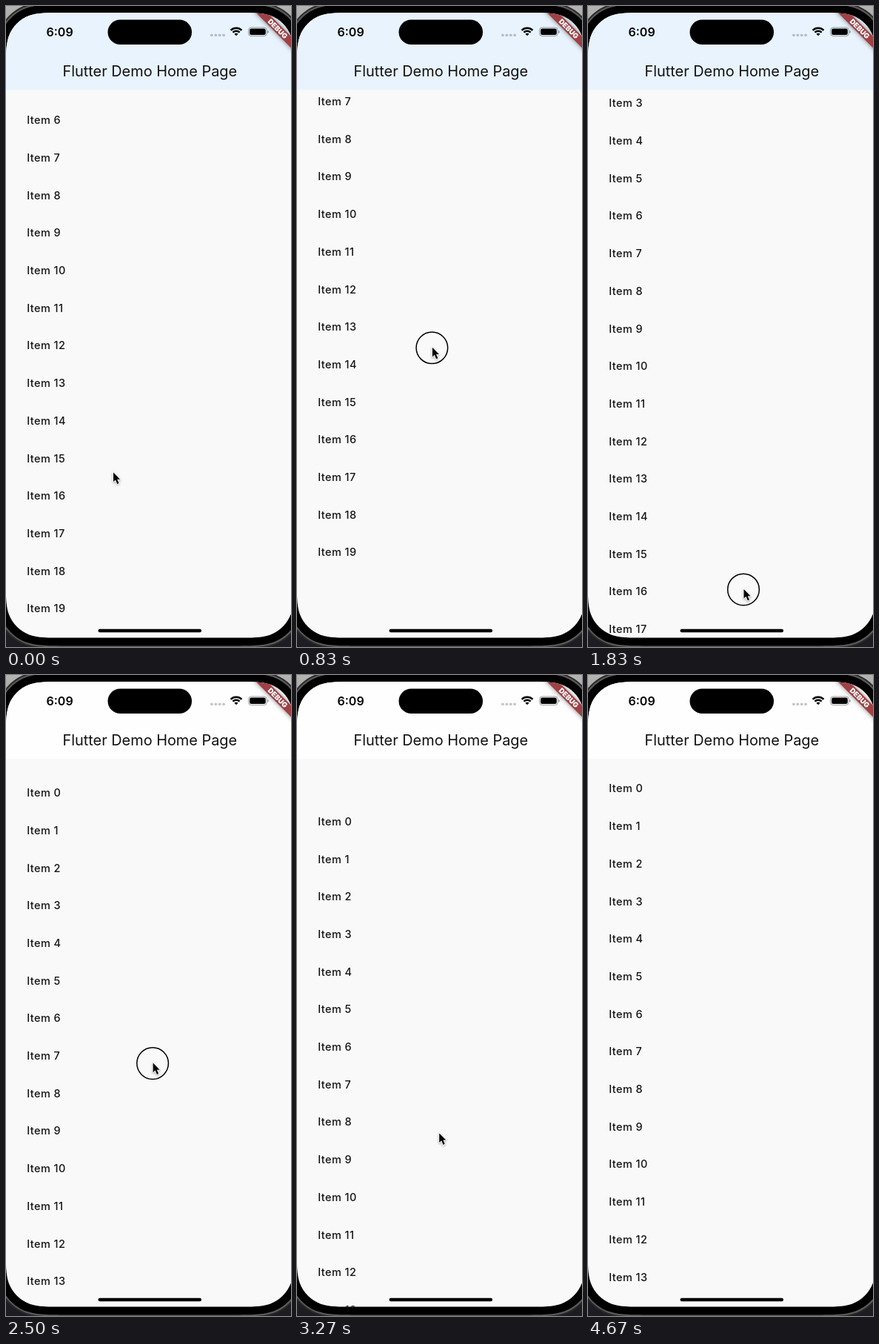
Write an HTML page with a canvas that moves like this. It is 385 by 865 pixels and loops after 4.71 s.

```html
<!DOCTYPE html>
<html lang="en">
<head>
<meta charset="utf-8">
<title>Scrolling list</title>
<style>
html, body { margin: 0; width: 100%; height: 100%; overflow: hidden; background: #000; }
canvas { display: block; width: 385px; height: 865px; }
</style>
</head>
<body>
<canvas id="stage"></canvas>
<script>
const W = 385, H = 865, LOOP = 4710;
const FONT = 'Inter, Roboto, sans-serif';
const SCREEN = { x: -0.2, y: 9, w: 389, h: 843.5, r: 51 };
const HEADER_END = 113, ROW = 50.7;

// Resting place of the first row when the list is at its start or end.
const TOP = 153.2, BOTTOM = -150.2;
// The list follows the pointer with a short delay.
const LAG = 50;
const DRAGS = [
  { from: 330, to: 1920, y: 629.5 },
  { from: 2380, to: 3170, y: 494 }
];
const EXIT = 3830;

// Pointer tip: time, x, y.
const path = [
  [0, 144.5, 629.5], [330, 150, 629.5], [760, 179, 470], [830, 182.3, 461],
  [1270, 205, 228], [1370, 208.5, 335], [1830, 210, 786.5], [1920, 209, 814],
  [2380, 198, 494], [2800, 198.5, 645], [3170, 198, 651],
  [3630, 106.5, 238], [EXIT, -12, -22]
];

const canvas = document.getElementById('stage');
const ctx = canvas.getContext('2d');
const dpr = window.devicePixelRatio || 1;
canvas.width = W * dpr;
canvas.height = H * dpr;

const clamp = v => Math.max(0, Math.min(1, v));

// Monotone cubic interpolation along one column of the path.
function along(t, col) {
  const last = path.length - 1;
  if (t >= path[last][0]) return path[last][col];
  let i = 0;
  while (t >= path[i + 1][0]) i++;
  const span = k => path[k + 1][0] - path[k][0];
  const slope = k => (path[k + 1][col] - path[k][col]) / span(k);
  const tangent = k => {
    if (k === 0) return slope(0);
    if (k === last) return slope(last - 1);
    const a = slope(k - 1), b = slope(k);
    return a * b <= 0 ? 0 : 2 * a * b / (a + b);
  };
  const d = span(i), u = (t - path[i][0]) / d, v = 1 - u;
  return v * v * (1 + 2 * u) * path[i][col] + u * v * v * d * tangent(i) +
    u * u * (3 - 2 * u) * path[i + 1][col] - u * u * v * d * tangent(i + 1);
}

// Overscroll distance for a drag past the edge.
function rubber(drag) {
  const pull = 0.52 * Math.max(0, drag);
  return pull / (1 + pull / 739);
}

function listTop(t) {
  const [first, second] = DRAGS;
  const pulled = (drag, time) => along(Math.max(0, time - LAG), 2) - drag.y;
  const firstPos = time => {
    const d = pulled(first, time);
    return d < 0 ? BOTTOM - rubber(-d) : BOTTOM + d;
  };
  const fling = first.to + LAG;
  if (t < fling) return firstPos(t);
  if (t < second.from + LAG) {
    return TOP - (TOP - firstPos(fling)) * Math.exp((fling - t) / 120);
  }
  if (t < second.to) return TOP + rubber(pulled(second, t));
  const w = (t - second.to) * 0.0135;
  return TOP + rubber(pulled(second, second.to)) * (1 + w) * Math.exp(-w);
}

function roundRect(x, y, w, h, r, color) {
  ctx.beginPath();
  ctx.roundRect(x, y, w, h, r);
  if (color) { ctx.fillStyle = color; ctx.fill(); }
}

// Rectangle with continuous-curvature corners.
function screenRect(grow, color) {
  const s = SCREEN, r = s.r + grow;
  const hw = s.w / 2 + grow, hh = s.h / 2 + grow;
  const a = 1.529 * r, b = 1.088 * r, c = 0.868 * r, d = 0.631 * r;
  const e = 0.373 * r, f = 0.169 * r, g = 0.075 * r;
  ctx.beginPath();
  for (const [sx, sy] of [[-1, -1], [1, -1], [1, 1], [-1, 1]]) {
    const flip = sx * sy < 0;
    const at = (p, q) => {
      const [u, v] = flip ? [q, p] : [p, q];
      return [s.x + s.w / 2 + sx * (hw - u), s.y + s.h / 2 + sy * (hh - v)];
    };
    ctx.lineTo(...at(0, a));
    ctx.bezierCurveTo(...at(0, b), ...at(0, c), ...at(g, d));
    ctx.bezierCurveTo(...at(f, e), ...at(e, f), ...at(d, g));
    ctx.bezierCurveTo(...at(c, 0), ...at(b, 0), ...at(a, 0));
  }
  ctx.closePath();
  ctx.fillStyle = color;
  ctx.fill();
}

function text(str, x, y, size, weight, spacing = 0, color = '#151515', align = 'left') {
  ctx.font = `${weight} ${size}px ${FONT}`;
  ctx.letterSpacing = spacing + 'px';
  ctx.textAlign = align;
  ctx.fillStyle = color;
  ctx.fillText(str, x, y);
}

function drawBezel() {
  const bg = ctx.createLinearGradient(0, 0, 0, H);
  bg.addColorStop(0, '#b4b4b2');
  bg.addColorStop(0.1, '#8c8c8c');
  bg.addColorStop(0.9, '#24242a');
  bg.addColorStop(1, '#1c1c22');
  ctx.fillStyle = bg;
  ctx.fillRect(0, 0, W, H);
  screenRect(15, '#2a2a2a');
  screenRect(13, '#5a5a5a');
  screenRect(11, '#000');
}

function drawList(t) {
  const top = listTop(t);
  ctx.save();
  ctx.beginPath();
  ctx.rect(0, HEADER_END, W, H);
  ctx.clip();
  for (let i = 0; i < 20; i++) {
    const y = top + i * ROW;
    if (y > 95 && y < 870) text('Item ' + i, 28.3, y + 5.2, 14.5, 500, 0.4);
  }
  ctx.restore();
}

function drawHeader(t) {
  const k = clamp((t - 2190) / 200);
  const mix = (a, b) => Math.round(a + (b - a) * k);
  ctx.fillStyle = `rgb(${mix(232, 254)},${mix(243, 254)},${mix(253, 254)})`;
  ctx.fillRect(0, 0, W, HEADER_END);
  text('Flutter Demo Home Page', 194.3, 94.8, 19.9, 400, 0, '#111', 'center');
}

function drawWifi() {
  const x = 311, y = 40.3;
  ctx.save();
  ctx.beginPath();
  ctx.moveTo(x, y);
  ctx.lineTo(x - 14, y - 14);
  ctx.lineTo(x + 14, y - 14);
  ctx.clip();
  ctx.strokeStyle = '#000';
  ctx.lineWidth = 2.4;
  for (const r of [6.6, 10.6]) {
    ctx.beginPath();
    ctx.arc(x, y, r, 0, 7);
    ctx.stroke();
  }
  ctx.beginPath();
  ctx.arc(x, y, 3.6, 0, 7);
  ctx.fillStyle = '#000';
  ctx.fill();
  ctx.restore();
}

function drawStatus() {
  text('6:09', 54.5, 40.8, 16, 600, 0, '#000');
  roundRect(137.5, 18.5, 113.5, 33.5, 16.75, '#000');
  for (let i = 0; i < 4; i++) roundRect(276 + i * 5.4, 37.4, 3.8, 3.8, 1.9, 'rgba(0,0,0,.22)');
  drawWifi();
  roundRect(327.5, 29, 24.8, 11.6, 3.8);
  ctx.strokeStyle = 'rgba(0,0,0,.38)';
  ctx.lineWidth = 1;
  ctx.stroke();
  roundRect(329, 30.5, 21.8, 8.6, 2.4, '#000');
  roundRect(353.4, 33, 1.4, 3.8, [0, 1.4, 1.4, 0], 'rgba(0,0,0,.4)');
}

function drawBanner() {
  ctx.save();
  ctx.translate(SCREEN.x + SCREEN.w, SCREEN.y);
  ctx.rotate(Math.PI / 4);
  ctx.shadowColor = 'rgba(0,0,0,.5)';
  ctx.shadowBlur = 6 * dpr;
  ctx.fillStyle = '#9f4044';
  ctx.fillRect(-40, 25.3, 80, 10.9);
  ctx.shadowColor = 'transparent';
  text('DEBUG', 0, 34.2, 9.5, 900, 0, '#fff', 'center');
  ctx.restore();
}

function drawPointer(t) {
  if (t >= EXIT) return;
  const x = along(t, 1), y = along(t, 2);
  if (DRAGS.some(d => t >= d.from && t < d.to)) {
    ctx.beginPath();
    ctx.arc(x, y + 0.5, 21.3, 0, 7);
    ctx.strokeStyle = '#000';
    ctx.lineWidth = 1.5;
    ctx.stroke();
  }
  ctx.save();
  ctx.translate(x, y);
  ctx.beginPath();
  [[0.5, 0], [0.5, 12.6], [3.4, 9.9], [5.8, 15.4], [8, 14.4], [5.7, 9.2], [9.6, 9.2]]
    .forEach(p => ctx.lineTo(...p));
  ctx.closePath();
  ctx.shadowColor = 'rgba(0,0,0,.35)';
  ctx.shadowBlur = 3 * dpr;
  ctx.shadowOffsetY = 1.2 * dpr;
  ctx.lineWidth = 1.6;
  ctx.lineJoin = 'round';
  ctx.strokeStyle = '#fff';
  ctx.stroke();
  ctx.shadowColor = 'transparent';
  ctx.fillStyle = '#000';
  ctx.fill();
  ctx.restore();
}

function draw(t) {
  ctx.setTransform(dpr, 0, 0, dpr, 0, 0);
  drawBezel();
  ctx.save();
  screenRect(0, '#f9f9f9');
  ctx.clip();
  drawList(t);
  drawHeader(t);
  drawStatus();
  drawBanner();
  roundRect(124.5, 840.7, 139.5, 4.5, 2.25, '#000');
  ctx.restore();
  drawPointer(t);
}

const start = performance.now();
function frame() {
  draw((performance.now() - start) % LOOP);
  requestAnimationFrame(frame);
}
draw(0);
requestAnimationFrame(frame);
</script>
</body>
</html>
```
